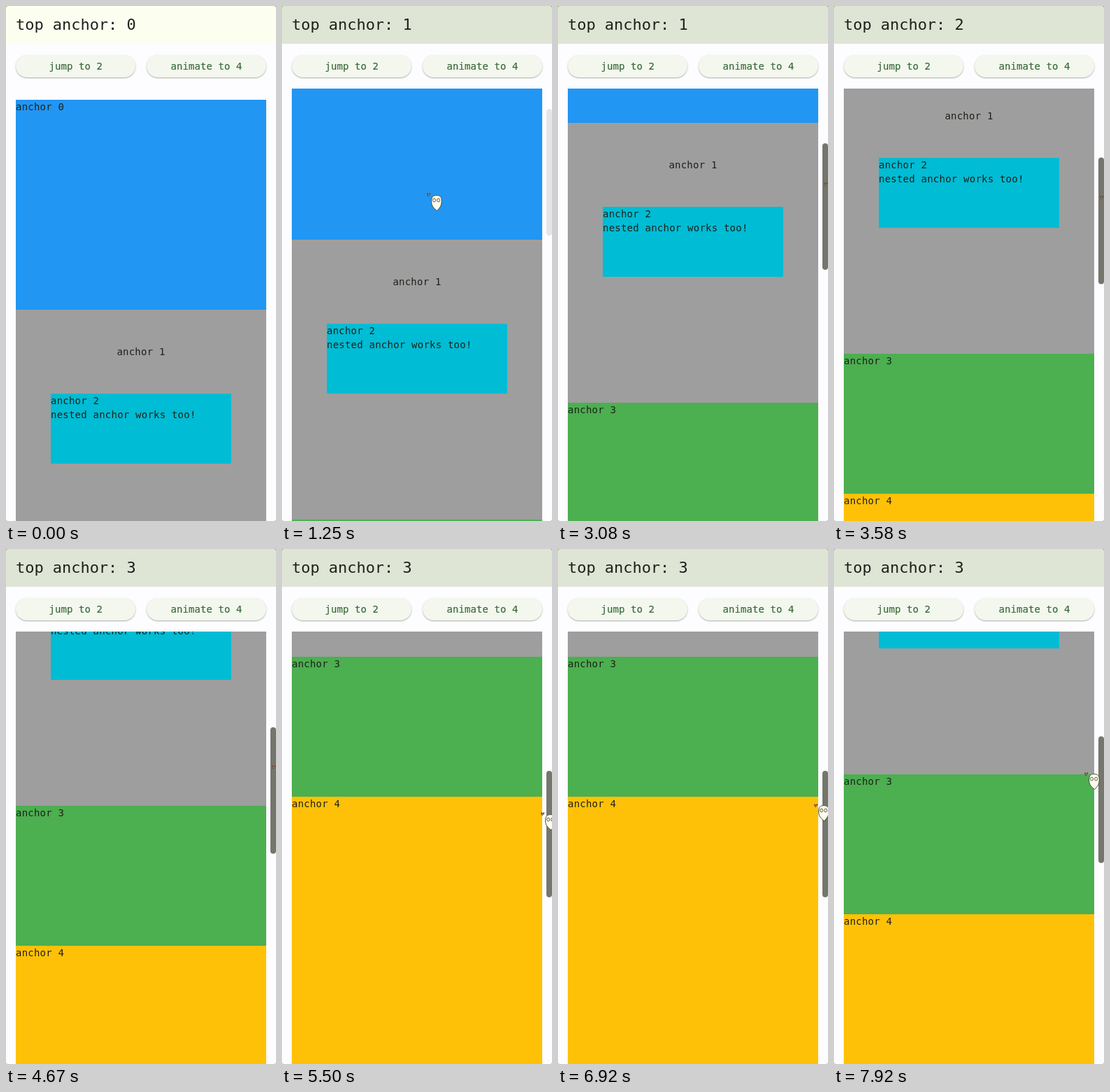
Recreate the animation shown at these times as an HTML page with a canvas. Size 386 by 736 pixels, loop 8000 ms.

```html
<!DOCTYPE html>
<html lang="en">
<head>
<meta charset="utf-8">
<title>Scroll anchors</title>
<style>
html, body { margin: 0; width: 100%; height: 100%; overflow: hidden; background: #fdfcff; }
canvas { display: block; width: 386px; height: 736px; }
</style>
</head>
<body>
<canvas id="stage"></canvas>
<script>
const W = 386, H = 736, LOOP = 8000, FPS = 12;
const VIEW_TOP = 118, VIEW_H = H - VIEW_TOP, CONTENT_H = 2112;
const RATIO = VIEW_H / CONTENT_H;
const INK = '#1f211a';
const MONO = '"DejaVu Sans Mono", "Liberation Mono", monospace';
const ANCHOR_TOPS = [16, 316, 436, 716, 916, 1416];

const canvas = document.getElementById('stage');
const ctx = canvas.getContext('2d');
const dpr = window.devicePixelRatio || 1;
canvas.width = W * dpr;
canvas.height = H * dpr;

const clamp = (v, a, b) => Math.min(b, Math.max(a, v));

// Piecewise linear value from [time, value] pairs
function linear(keys, t) {
  if (t <= keys[0][0]) return keys[0][1];
  for (let i = 1; i < keys.length; i++) {
    const [t0, a] = keys[i - 1], [t1, b] = keys[i];
    if (t <= t1) return a + (b - a) * (t - t0) / (t1 - t0);
  }
  return keys[keys.length - 1][1];
}

// Monotone cubic through [time, value] pairs
function smooth(keys, t) {
  const n = keys.length - 1;
  if (t <= keys[0][0]) return keys[0][1];
  if (t >= keys[n][0]) return keys[n][1];
  const slope = i => (keys[i + 1][1] - keys[i][1]) / (keys[i + 1][0] - keys[i][0]);
  const tangent = i => {
    if (i === 0 || i === n) return 0;
    const a = slope(i - 1), b = slope(i);
    return a * b <= 0 ? 0 : 2 * a * b / (a + b);
  };
  let i = 0;
  while (t > keys[i + 1][0]) i++;
  const [t0, a] = keys[i], [t1, b] = keys[i + 1];
  const d = t1 - t0, u = (t - t0) / d, u2 = u * u, u3 = u2 * u;
  return a * (2 * u3 - 3 * u2 + 1) + d * tangent(i) * (u3 - 2 * u2 + u) +
         b * (3 * u2 - 2 * u3) + d * tangent(i + 1) * (u3 - u2);
}

const DRAG = [[2583, 200], [3417, 323], [3583, 337], [3667, 347], [3750, 347], [4583, 464],
              [4667, 467], [5500, 680], [6000, 817], [6333, 817], [6917, 680], [7917, 512]];
const THUMB_ALPHA = [[417, 0], [833, 0.1], [2167, 0.1], [2417, 0.5]];
const POINTER_X = [[500, 380], [833, 207], [1583, 207], [2333, 380], [4667, 380],
                   [5500, 370], [6000, 367], [6917, 366], [7917, 358]];
const POINTER_Y = [[500, 215], [833, 267], [1583, 267], [2333, 228]];

// Two wheel notches, then dragging the thumb
function scrollAt(t) {
  if (t < 1166) return 0;
  if (t < 1416) return 100;
  return smooth(DRAG, t);
}
const thumbTop = s => VIEW_TOP + s * RATIO;

function rect(x, y, w, h, color) {
  ctx.fillStyle = color;
  ctx.fillRect(x, y, w, h);
}

function pill(x, y, w, h, r, color) {
  ctx.fillStyle = color;
  ctx.beginPath();
  ctx.roundRect(x, y, w, h, r);
  ctx.fill();
}

function text(str, x, y, size = 14, spacing = 0.22, color = INK) {
  ctx.font = `${size}px ${MONO}`;
  ctx.letterSpacing = spacing + 'px';
  ctx.fillStyle = color;
  ctx.fillText(str, x, y);
}

function header(label, tint) {
  const mix = (a, b) => Math.round(a + (b - a) * tint);
  rect(0, 0, W, 54, `rgb(${mix(252, 222)},${mix(255, 229)},${mix(240, 213)})`);
  text('top anchor: ' + label, 14, 34, 22, -0.04);
}

function button(x, str, textX) {
  ctx.save();
  ctx.shadowColor = 'rgba(50,60,40,.4)';
  ctx.shadowBlur = 2 * dpr;
  ctx.shadowOffsetY = dpr;
  pill(x, 70, 171, 32, 16, '#f3f7ee');
  ctx.restore();
  const green = '#3b6b3c';
  text(str, textX, 91, 14, 0.07, green);
  ctx.strokeStyle = green;
  ctx.lineWidth = 0.2;
  ctx.strokeText(str, textX, 91);
}

function content(s) {
  ctx.save();
  ctx.beginPath();
  ctx.rect(0, VIEW_TOP, W, VIEW_H);
  ctx.clip();
  ctx.translate(0, VIEW_TOP - s);
  const block = (i, h, color) => {
    rect(14, ANCHOR_TOPS[i], 358, h, color);
    if (i !== 1) text('anchor ' + i, 14, ANCHOR_TOPS[i] + 15);
  };
  block(0, 300, '#2196f3');
  block(1, 400, '#9e9e9e');
  text('anchor 1', 158.4, 381);
  rect(64, 436, 258, 100, '#00bcd4');
  text('anchor 2', 64, 451);
  text('nested anchor works too!', 64, 471);
  block(3, 200, '#4caf50');
  block(4, 500, '#ffc107');
  block(5, 680, '#f44336');
  ctx.restore();
}

function pointer(x, y, bob) {
  ctx.lineJoin = 'round';
  ctx.lineWidth = 1;

  // heart tip
  ctx.strokeStyle = '#5a3a24';
  ctx.fillStyle = '#c9a08c';
  ctx.beginPath();
  ctx.moveTo(x + 0.5, y + 1);
  ctx.lineTo(x + 2.5, y + 1.6);
  ctx.lineTo(x + 4.6, y + 0.8);
  ctx.lineTo(x + 4.4, y + 2.6);
  ctx.lineTo(x + 1.8, y + 4.6);
  ctx.closePath();
  ctx.fill();
  ctx.stroke();

  // little ghost
  ctx.save();
  ctx.translate(x + 6, y + 2 + bob);
  ctx.strokeStyle = '#4a4a38';
  ctx.fillStyle = '#fffcee';
  ctx.beginPath();
  ctx.moveTo(0.6, 9);
  ctx.bezierCurveTo(0.6, 3, 3, 0.6, 8, 0.6);
  ctx.bezierCurveTo(13, 0.6, 15.4, 3, 15.2, 9);
  ctx.bezierCurveTo(15.2, 15, 13, 18, 8.6, 22.6);
  ctx.bezierCurveTo(4, 19, 0.6, 16, 0.6, 9);
  ctx.fill();
  ctx.stroke();
  ctx.lineWidth = 0.9;
  for (const ex of [4.6, 10.6]) {
    ctx.beginPath();
    ctx.ellipse(ex, 7.6, 2, 2.4, 0, 0, Math.PI * 2);
    ctx.stroke();
  }
  ctx.restore();
}

function corners() {
  const r = 3;
  for (const [x, y, color] of [[0, 0, '#8fa02c'], [W, 0, '#8fa02c'], [0, H, '#b9b9b0'], [W, H, '#b9b9b0']]) {
    const dx = x ? -r : r, dy = y ? -r : r;
    ctx.fillStyle = color;
    ctx.beginPath();
    ctx.moveTo(x, y);
    ctx.lineTo(x + dx, y);
    ctx.quadraticCurveTo(x, y, x, y + dy);
    ctx.fill();
  }
}

function draw(time) {
  const step = Math.floor((time % LOOP + 5) * FPS / 1000) % (LOOP * FPS / 1000);
  const t = step * 1000 / FPS;
  const s = Math.round(scrollAt(t));
  const label = ANCHOR_TOPS.findIndex(top => top >= s);

  ctx.setTransform(dpr, 0, 0, dpr, 0, 0);
  rect(0, 0, W, H, '#fdfcff');
  content(s);
  header(label, clamp((t - 1083) / 167, 0, 1));
  button(14, 'jump to 2', 61.6);
  button(201, 'animate to 4', 235.6);

  const alpha = t > 2490 ? 0.6 : linear(THUMB_ALPHA, t);
  if (alpha) pill(378, thumbTop(s), 8, VIEW_H * RATIO, 4, `rgba(26,30,14,${alpha})`);

  if (step >= 6) {
    // the pointer runs one step ahead of the dragged thumb
    const y = t < 2500 ? linear(POINTER_Y, t) : thumbTop(scrollAt(t + 1000 / FPS)) + 51.5;
    const bob = Math.floor((t - 990) / 258) & 1;
    pointer(Math.round(linear(POINTER_X, t)), Math.round(y), bob);
  }
  corners();
}

const start = performance.now();
function tick() {
  draw(performance.now() - start);
  requestAnimationFrame(tick);
}
tick();
</script>
</body>
</html>
```
